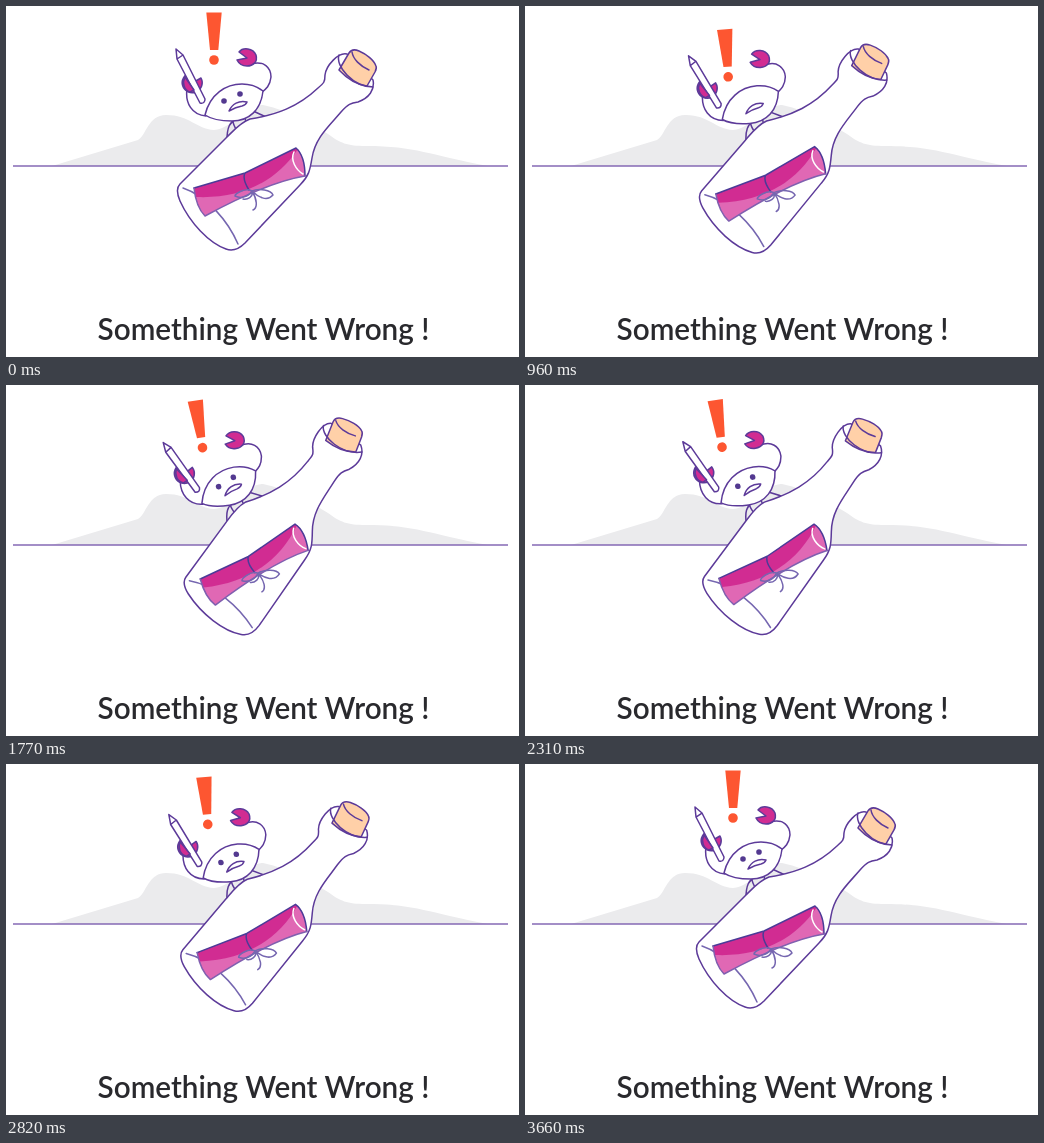
An HTML page that plays this animation: 513 by 351 pixels, repeating every 3.72 s.

```html
<!DOCTYPE html>
<html lang="en">
<head>
<meta charset="utf-8">
<title>Something Went Wrong</title>
<style>
  html, body { margin: 0; width: 100%; height: 100%; overflow: hidden; background: #fff; }
  svg { display: block; width: 513px; height: 351px; }
  .ink { fill: none; stroke: #5c3a99; stroke-width: 1.5; stroke-linecap: round; stroke-linejoin: round; }
  .white { fill: #fff; }
  .pink { fill: #d12c92; }
  text { font: 600 29.7px Lato, "Open Sans", sans-serif; fill: #29292d; text-anchor: middle; }
</style>
</head>
<body>
<svg viewBox="0 0 513 351">
  <path fill="#ebebed" d="M46 160L132 134C140 130 142 109 160 109C184 109 190 123 208 124C228 122 240 99 257 99C285 105 306 118 322 128C334 137 341 140 360 140C410 140 423 149 482 160Z"/>
  <path d="M7 160H502" stroke="#8468b4" stroke-width="1.5"/>

  <g id="crab">
    <g class="ink">
      <path d="M221 134C221 121 224 116 230 113M231 125C228 120 227 118 227 115M240 116C238 111 240 109 243 107M245 104L260 111"/>
      <path d="M200 110C186 109 179 97 181 83M245 58C258 54 265 62 265 71C264 80 260 83 255 87"/>
      <path class="white" d="M199 109C204 88 220 78 236 78C246 78 252 81 257 85C255 104 243 115 226 115C214 115 205 113 199 109Z"/>
      <path class="white" d="M223 105C226 98 233 94 241 96Q240 99 236 100Q230 101 223 105Z"/>
      <path class="pink" d="M184 67A10 10 0 1 0 195 72L188 76Z"/>
      <path class="pink" d="M233 46C237 41 247 42 250 49C252 56 247 60 241 60Q234 60 231 54L241 52Z"/>
      <path class="white" d="M170 43L177 49L199 93Q199 98 194 97L171 53ZM171 53L177 49"/>
      <path class="pink" d="M179 71C176 77 178 84 184 86L188 84Z"/>
    </g>
    <g id="eyes" fill="#533990">
      <circle cx="218" cy="95" r="2.8"/>
      <circle cx="234" cy="88" r="2.8"/>
    </g>
    <g id="alert" fill="#fd5631">
      <path d="M200.3 6.5H215.7L212.3 44H204Z"/>
      <circle cx="208" cy="54" r="4.8"/>
    </g>
  </g>

  <g id="bottle" class="ink">
    <path class="white" d="M341 48C332 46 320 60 319 69C319 76 318 77 312 82C292 101 270 109 244 113C235 116 228 124 221 131L174 178C170 182 171 188 174 195C184 217 203 237 220 243C228 246 234 242 239 237L294 179C303 170 304 164 306 152C309 132 323 120 335 106C342 98 345 97 352 96C363 92 369 84 367 74Z"/>
    <path d="M177 182C201 190 222 215 232 238" stroke="#7566b0"/>
    <path fill="#ffd0a8" d="M333 64L343 47Q346 42 353 45C360 48 368 54 370 60Q371 62 369 66L361 80Q346 78 333 64Z"/>
    <path d="M346 46C347 53 354 60 363 64M333 49C329 60 347 81 367 81"/>
    <path class="pink" stroke="none" d="M188 182L239 167L290 142Q299 150 299 170Q262 176 199 210Q190 201 188 182Z"/>
    <path fill="#e068b4" stroke="none" d="M190 191C235 193 270 176 292 143Q299 152 299 170Q262 176 199 210Q193 204 190 191Z"/>
    <path stroke="#4b3b98" d="M188 182L239 167L290 142Q299 150 299 170M239 167Q236 173 243 184"/>
    <path stroke="#8060b0" d="M299 170Q262 176 199 210Q190 201 188 182"/>
    <path stroke="#fff" d="M288 146C284 154 290 164 297 168"/>
    <path stroke="#7566b0" d="M246 185C239 181 229 188 229 190C235 193 242 191 246 185C253 182 265 184 267 189C261 196 252 191 246 185C251 193 252 202 247 204M246 185C248 191 241 194 237 193"/>
  </g>

  <text x="257.5" y="334">Something Went Wrong !</text>
</svg>
<script>
  const LOOP = 3720, PEAK = 2000, END = 3690, SWING = 9;
  const $ = id => document.getElementById(id);
  const ease = x => Math.sin(Math.PI / 2 * Math.max(0, Math.min(1, x))) ** 2;
  const pulse = (t, center, half) => ease(1 - Math.abs(t - center) / half);
  const spin = (id, angle, x, y) => $(id).setAttribute('transform', `rotate(${angle} ${x} ${y})`);

  function draw() {
    const t = performance.now() % LOOP;
    const angle = -SWING * (t < PEAK ? ease(t / PEAK) : ease((END - t) / (END - PEAK)));
    spin('bottle', angle, 270, 147);
    spin('crab', angle, 259, 134);

    const dip = 13.5 * (pulse(t, 930, 220) + pulse(t, 2640, 240));
    $('alert').setAttribute('transform', `translate(0 ${dip})`);

    const open = 1 - Math.min(1, 1.4 * pulse(t, 950, 120));
    $('eyes').setAttribute('transform', `translate(0 ${92 * (1 - open)}) scale(1 ${open})`);
    requestAnimationFrame(draw);
  }
  draw();
</script>
</body>
</html>
```
